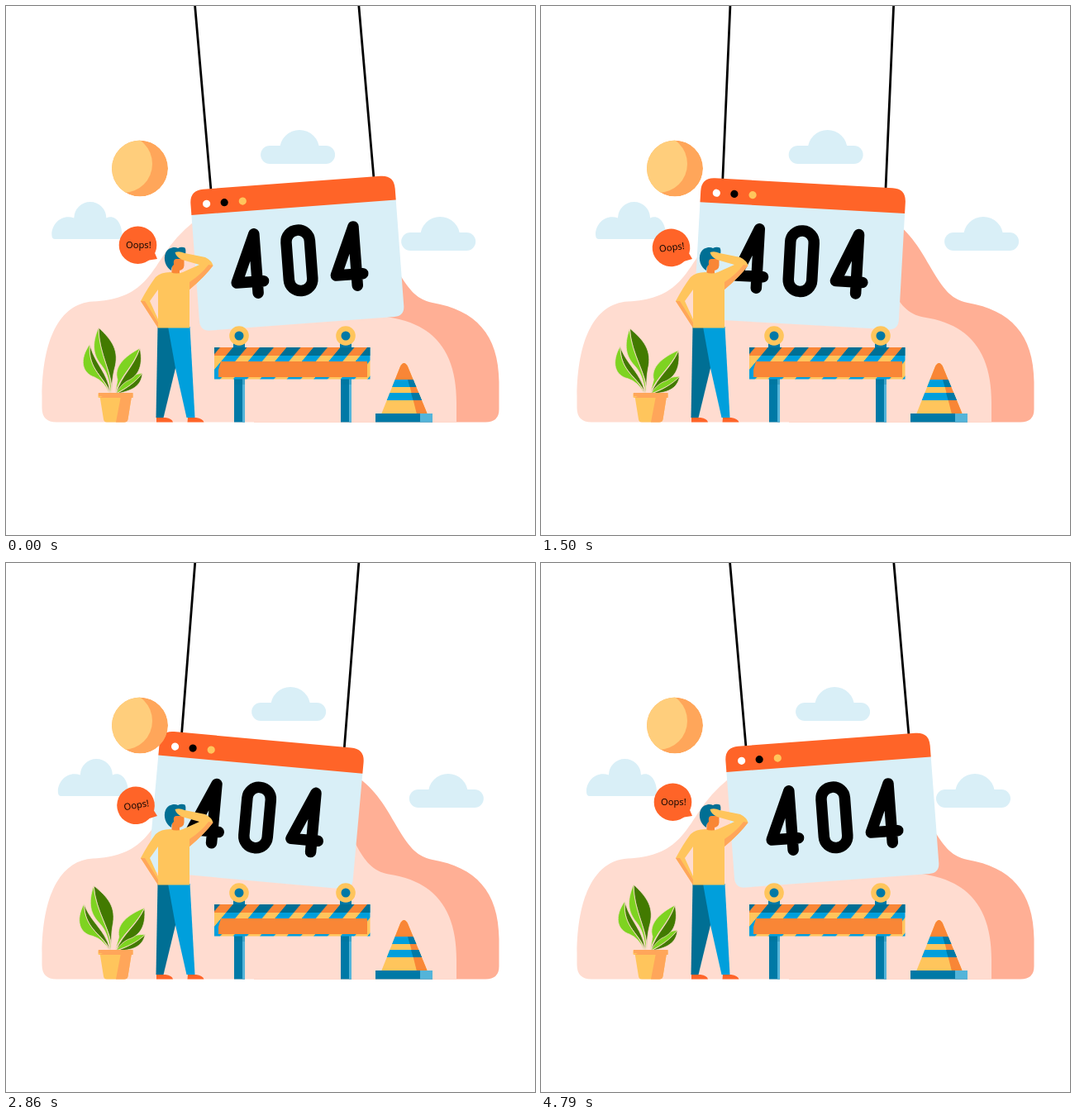
An HTML page for the animation above (4.87 s loop, 640 by 640 pixels).

```html
<!DOCTYPE html>
<html lang="en">
<head>
<meta charset="utf-8">
<title>404</title>
<style>
  html, body { margin: 0; height: 100%; overflow: hidden; background: #fff; }
  svg { display: block; width: 100vw; height: 100vh; }
  .sky { fill: #d9eff7; }
  .red { fill: #ff6428; }
  .orange { fill: #f98636; }
  .shade { fill: #ffa65a; }
  .yellow { fill: #ffc55c; }
  .navy { fill: #006f94; }
  .teal { fill: #0079a6; }
  .blue { fill: #009fdc; }
  .pale { fill: #53b4d9; }
  .lime { fill: #7ed321; }
  .leaf { fill: #427a00; }
  .plant path { stroke: #ffdcd0; stroke-width: .7; }
</style>
</head>
<body>
<svg viewBox="0 0 640 640">
  <defs>
    <clipPath id="disc"><circle cx="162" cy="196.5" r="34"/></clipPath>
    <clipPath id="coneShape"><path d="M454 494L477 436Q481.500 428 486 436L510 494Z"/></clipPath>
    <pattern id="stripesDark" width="32.500" height="40" patternUnits="userSpaceOnUse" patternTransform="translate(307 413) skewX(-40)">
      <rect class="orange" width="33" height="40"/><rect class="navy" width="17" height="40"/>
    </pattern>
    <pattern id="stripesLight" width="32.500" height="40" patternUnits="userSpaceOnUse" patternTransform="translate(307 413) skewX(-40)">
      <rect class="yellow" width="33" height="40"/><rect class="blue" width="17" height="40"/>
    </pattern>
    <g id="cloud"><rect y="19" width="90" height="22" rx="11"/><path d="M23 30V24A24 24 0 0 1 71 24V30Z"/></g>
    <path id="four" d="M25 -57.500V14M25 -57.500L0 0H32.500"/>
    <g id="post">
      <rect class="teal" x="-6" y="449" width="13" height="54.500"/>
      <rect class="pale" x="4" y="449" width="3" height="54.500"/>
      <rect class="navy" x="-6" y="449" width="13" height="9" opacity=".25"/>
      <rect class="teal" x="-7" y="407" width="14" height="7"/>
      <circle class="yellow" cy="399" r="11.800"/><circle class="teal" cy="399" r="5.500"/>
    </g>
  </defs>

  <!-- hills -->
  <path fill="#ffaf95" d="M300 260L400 245C440 262 455 288 470 314C486 342 496 355 516 359C568 368 596 397 596.500 455V488Q596.500 503.500 580 503.500H300Z"/>
  <path fill="#ffdcd0" d="M43.500 486V472C44 405 64 360 105 357.500C160 355 172 329 191 301Q206 278 226 262L260 240H390C402 275 412 318 423 340C434 361 444 373 463 376.500C520 385 545 420 545 480V503.500H61Q43.500 503.500 43.500 486Z"/>

  <g class="sky">
    <use id="cloudTop" href="#cloud"/>
    <use id="cloudRight" href="#cloud"/>
    <path id="cloudLeft" d="M4 45.500Q0 45.500 0 40C0 27 12 15 27 20A19.500 19.500 0 0 1 66 20C77 15 85 27 85 40Q85 45.500 80 45.500Z"/>
  </g>

  <g id="sign">
    <path stroke="#000" stroke-width="2.800" d="M229 -40V216M426.500 -40V217"/>
    <g transform="translate(326.200 300) rotate(.7)">
      <path class="sky" d="M-124 -57H124V73Q124 85.500 111.500 85.500H-111.500Q-124 85.500 -124 73Z"/>
      <path class="red" d="M-124 -55.500V-69Q-124 -85.500 -107.500 -85.500H107.500Q124 -85.500 124 -69V-55.500Z"/>
      <circle cx="-104.800" cy="-67.700" r="4.600" fill="#fff"/>
      <circle cx="-83.200" cy="-67.700" r="4.600"/>
      <circle class="yellow" cx="-61" cy="-67.700" r="4.600"/>
      <g fill="none" stroke="#000" stroke-width="13.500" stroke-linecap="round" stroke-linejoin="round">
        <use href="#four" x="-75.500" y="30.500"/>
        <rect x="-12.200" y="-27.800" width="28.500" height="73.500" rx="14"/>
        <use href="#four" x="45" y="30.500"/>
      </g>
    </g>
  </g>

  <!-- sun -->
  <g clip-path="url(#disc)">
    <circle class="shade" cx="162" cy="196.500" r="34"/>
    <circle fill="#ffce7c" cx="142" cy="191" r="35"/>
  </g>

  <g id="bubble">
    <path class="red" d="M170 308L183 306L178 294Z"/>
    <circle class="red" cx="159.500" cy="289.200" r="22.800"/>
    <text x="160.300" y="292.800" font-family="'Open Sans', sans-serif" font-size="11.200" text-anchor="middle">Oops!</text>
  </g>

  <!-- plant -->
  <g class="plant">
    <g id="leafSmall">
      <path class="leaf" d="M165 444C164 460 152 466 133 469C146 463 156 455 165 444Z"/>
      <path class="lime" d="M165 444C149 447 137 453 133 469C146 462 157 455 165 444Z"/>
    </g>
    <g id="leafRight">
      <path class="leaf" d="M162 414C167 438 158 449 146 454Q138 459 133 469C140 446 154 438 162 414Z"/>
      <path class="lime" d="M162 414C143 424 130 437 135 452L132 469C139 446 153 438 162 414Z"/>
    </g>
    <g id="leafLeft">
      <path class="leaf" d="M101.500 409C104 424 116 438 121 450Q125 458 126 469C121 449 98 441 101.500 409Z"/>
      <path class="lime" d="M101.500 409C88 428 92 444 107 449Q119 454 125 469C121 449 98 441 101.500 409Z"/>
    </g>
    <g id="leafTall">
      <path class="leaf" d="M112 389C128 404 138 417 131 440Q128 452 128 469C130 445 112 422 112 389Z"/>
      <path class="lime" d="M112 389C103 410 106 423 115 434C124 445 125 456 127 469C130 445 112 422 112 389Z"/>
    </g>
  </g>
  <path class="yellow" d="M113.500 472H152L147.500 500Q147 503.500 143 503.500H122Q118.500 503.500 118 500Z"/>
  <path class="shade" d="M139 472H152L147.500 500Q147 503.500 143 503.500H133Z"/>
  <rect class="yellow" x="111.500" y="468" width="42" height="6" rx="1"/>
  <path class="shade" d="M112 468H153.500V474H113L117 472H112Z"/>

  <!-- visitor -->
  <g>
    <path class="navy" d="M183.500 388H206L207 430L190.500 498H181.500Z"/>
    <path class="blue" d="M196 388H222.500L228.500 498H218.500L205 438Z"/>
    <path class="red" d="M182 503.500V498H193Q201 499 202 503.500ZM219.500 503.500L220 498H230Q238 499 239.500 503.500Z"/>
    <path class="orange" d="M201 314H210V326H200Z"/>
    <path class="orange" d="M203 304H215.500V314Q215 320 208 320L201 317Z"/>
    <path class="navy" d="M200 320C193 316 190 306 193 299C196 292 204 291 208 293Q212 291 216.500 292.500Q218.500 296 216 306H206Q202 306 203 313Q200 315 200 320Z"/>
    <path class="yellow" fill-rule="evenodd" d="M199 322Q206 325 214 322L234 313L213 307Q206 304 204.500 298Q210 296 216 299L241 304Q249 308 250.500 314Q240 328 222 343V389.500H184L163 357Q172 340 181 328Q187 322 199 322ZM184 343L174 357L184 379Z"/>
    <path class="shade" d="M250.500 314Q240 328 222 343V334Q236 325 245 313Z"/>
    <path class="shade" d="M163 357L168 357L184 383V389.500Z"/>
  </g>

  <!-- barrier -->
  <use href="#post" x="282"/>
  <use href="#post" x="411"/>
  <rect x="252" y="413" width="188.500" height="38.500" fill="url(#stripesLight)"/>
  <rect x="252" y="413" width="188.500" height="10" fill="url(#stripesDark)"/>
  <path class="orange" d="M260 430H437V449H257V440Z"/>

  <!-- cone -->
  <g clip-path="url(#coneShape)">
    <rect class="yellow" x="450" y="430" width="64" height="64"/>
    <path class="orange" d="M450 430H514V452H450ZM481 430H490L510 494H497Z"/>
    <path class="blue" d="M450 452H514V461H450ZM450 468H514V477H450Z"/>
    <path class="teal" d="M486 452H514V461H488.500ZM490 468H514V477H492.500Z"/>
  </g>
  <rect class="teal" x="447" y="493" width="69" height="10.500"/>
  <rect class="pale" x="501" y="493" width="15" height="10.500"/>
</svg>
<script>
  const LOOP = 4870;
  const part = id => document.getElementById(id);
  const wave = (t, peak) => Math.cos(2 * Math.PI * (t - peak) / LOOP);
  const turn = (id, angle, x, y) => part(id).setAttribute('transform', `rotate(${angle} ${x} ${y})`);
  const move = (id, x, y) => part(id).setAttribute('transform', `translate(${x} ${y})`);

  function draw(now) {
    const t = now % LOOP;
    const s = wave(t, -40);
    const swing = s * (1.28 - 0.28 * s * s); // a little firmer than a sine
    const bend = (1 - swing) / 2;

    turn('sign', -4.97 * swing, 328, 0);
    turn('bubble', -10 * bend, 183, 306);
    turn('leafTall', -4.5 * bend, 127, 469);
    turn('leafLeft', -7.3 * bend, 125, 469);
    turn('leafRight', 6.3 * bend, 133, 469);
    turn('leafSmall', 9.3 * bend, 133, 469);

    move('cloudTop', 302.1 + 6 * s, 150);
    move('cloudRight', 484 + 6.2 * wave(t, 2160), 255);
    move('cloudLeft', 60.5 + 6.5 * wave(t, 1930), 236.5);
    requestAnimationFrame(draw);
  }
  draw(performance.now());
</script>
</body>
</html>
```
